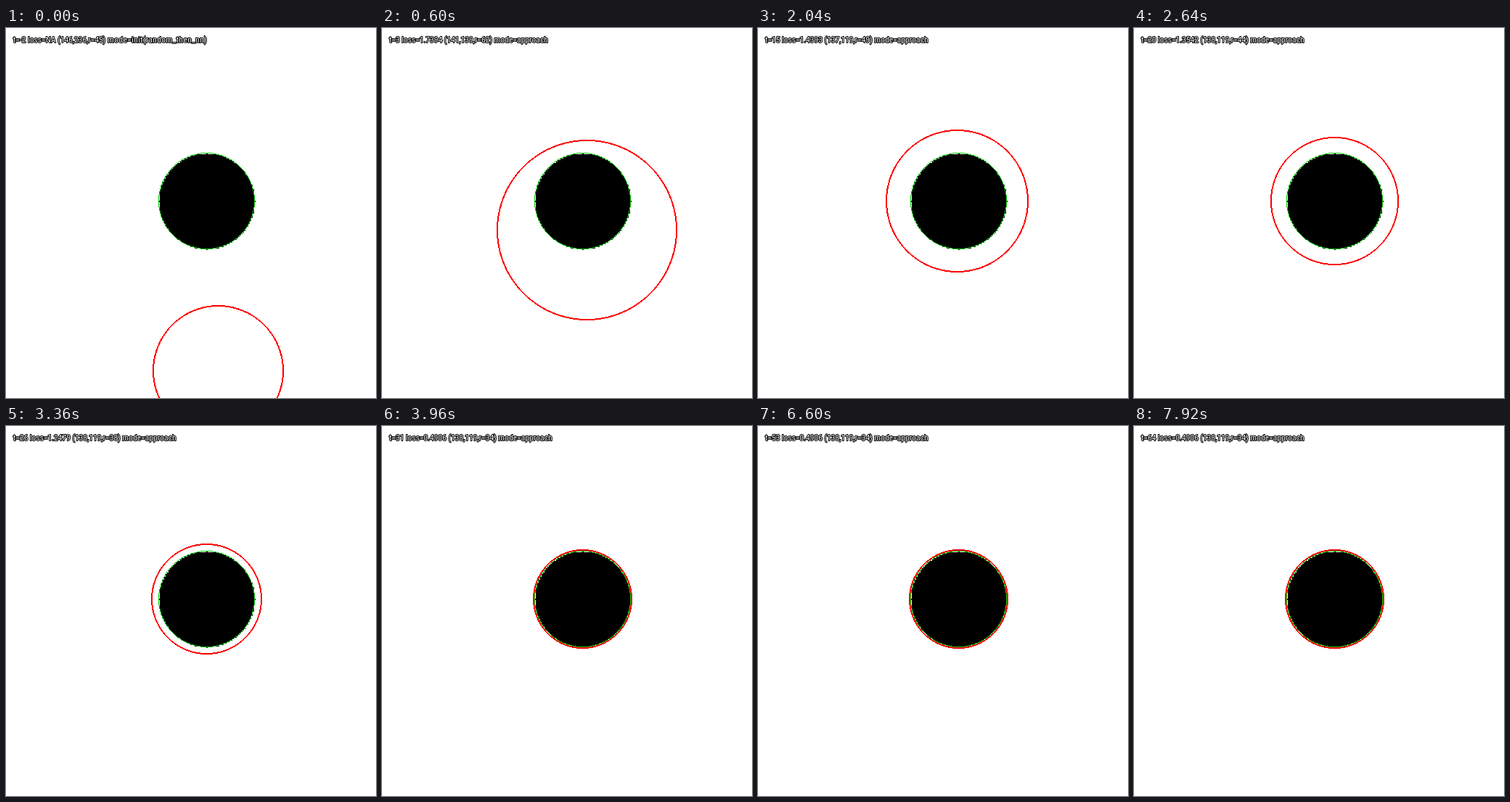
An HTML page with a canvas that plays this animation: 510x510 px, repeating every 8 s.

```html
<!DOCTYPE html>
<html lang="en">
<head>
<meta charset="utf-8">
<title>Circle fitting</title>
<style>
  html, body { margin: 0; width: 100%; height: 100%; overflow: hidden; background: #fff; }
  canvas { display: block; }
</style>
</head>
<body>
<canvas id="stage" width="510" height="510"></canvas>
<script>
const ctx = document.getElementById('stage').getContext('2d');
const LOOP = 8000, STEP = 120, FIRST = -2, SCALE = 2;
const GOAL = { x: 138, y: 119, r: 33 };

// Piecewise linear curve through [t, value] points.
function curve(points, t) {
  if (t <= points[0][0]) return points[0][1];
  for (let i = 1; i < points.length; i++) {
    const [t0, v0] = points[i - 1], [t1, v1] = points[i];
    if (t <= t1) return v0 + (v1 - v0) * (t - t0) / (t1 - t0);
  }
  return points[points.length - 1][1];
}

const RADIUS = [[-2, 45], [2, 63], [5, 59], [30, 34]];
const LOSS = [[-1, 1.9246], [7, 1.5542], [15, 1.4393], [20, 1.3542],
              [26, 1.2479], [29, 1.1921], [30, 0.4906]];

// Fast approach that overshoots, then a slow drift back to the goal.
function guess(t) {
  const x = t < 7 ? 144 - t : t < 17 ? 137 : 138;
  const y = t < 7 ? 112 + 124 * ((7 - t) / 9) ** 1.9
                  : Math.min(119, Math.max(112, 104 + t));
  return { x, y: Math.round(y), r: Math.round(curve(RADIUS, t)) };
}

function disc({ x, y, r }) {
  ctx.fillStyle = '#000';
  for (let dy = -r; dy <= r; dy++) {
    const half = Math.floor(Math.sqrt(r * r - dy * dy));
    ctx.fillRect((x - half) * SCALE, (y + dy) * SCALE, (2 * half + 1) * SCALE, SCALE);
  }
}

// Hard-edged ring between two midpoint circles, width measured inwards.
function ring({ x, y, r }, width, color) {
  const cx = x * SCALE, cy = y * SCALE, R = r * SCALE;
  const reach = (radius, q) => Math.round(Math.sqrt(radius * radius - q * q));
  ctx.fillStyle = color;
  for (let dy = -R; dy <= R; dy++) {
    for (let dx = -R; dx <= R; dx++) {
      const p = Math.max(Math.abs(dx), Math.abs(dy));
      const q = Math.min(Math.abs(dx), Math.abs(dy));
      if (p <= reach(R, q) && p >= reach(R - width + 1, q)) {
        ctx.fillRect(cx + dx, cy + dy, 1, 1);
      }
    }
  }
}

function label(t, c) {
  const start = t === FIRST;
  const loss = start ? 'NA' : curve(LOSS, t).toFixed(4);
  const head = `t=${t} loss=${loss} (${c.x},${c.y},r=${c.r}) `;
  const tail = 'mode=' + (start ? 'init(random_then_nn)' : 'approach');
  const headGap = '0.11px', tailGap = start ? '0.47px' : '0.12px';
  ctx.font = '10px Roboto, "Liberation Sans", sans-serif';
  ctx.lineWidth = 2;
  ctx.lineJoin = 'round';
  ctx.strokeStyle = '#000';
  ctx.fillStyle = '#fff';
  ctx.letterSpacing = headGap;
  const split = 10 + ctx.measureText(head).width;
  const parts = [[head, 10, headGap], [tail, split, tailGap]];
  for (const paint of ['strokeText', 'fillText']) {
    for (const [text, x, gap] of parts) {
      ctx.letterSpacing = gap;
      ctx[paint](text, x, 20);
    }
  }
}

function draw(t) {
  ctx.fillStyle = '#fff';
  ctx.fillRect(0, 0, 510, 510);
  const c = guess(t);
  disc(GOAL);
  ring(GOAL, 1, '#00c800');
  ring(c, 2, '#f00');
  label(t, c);
}

let shown = null;
function tick() {
  const t = FIRST + Math.floor(performance.now() % LOOP / STEP);
  if (t !== shown) draw(shown = t);
  requestAnimationFrame(tick);
}
tick();
</script>
</body>
</html>
```
